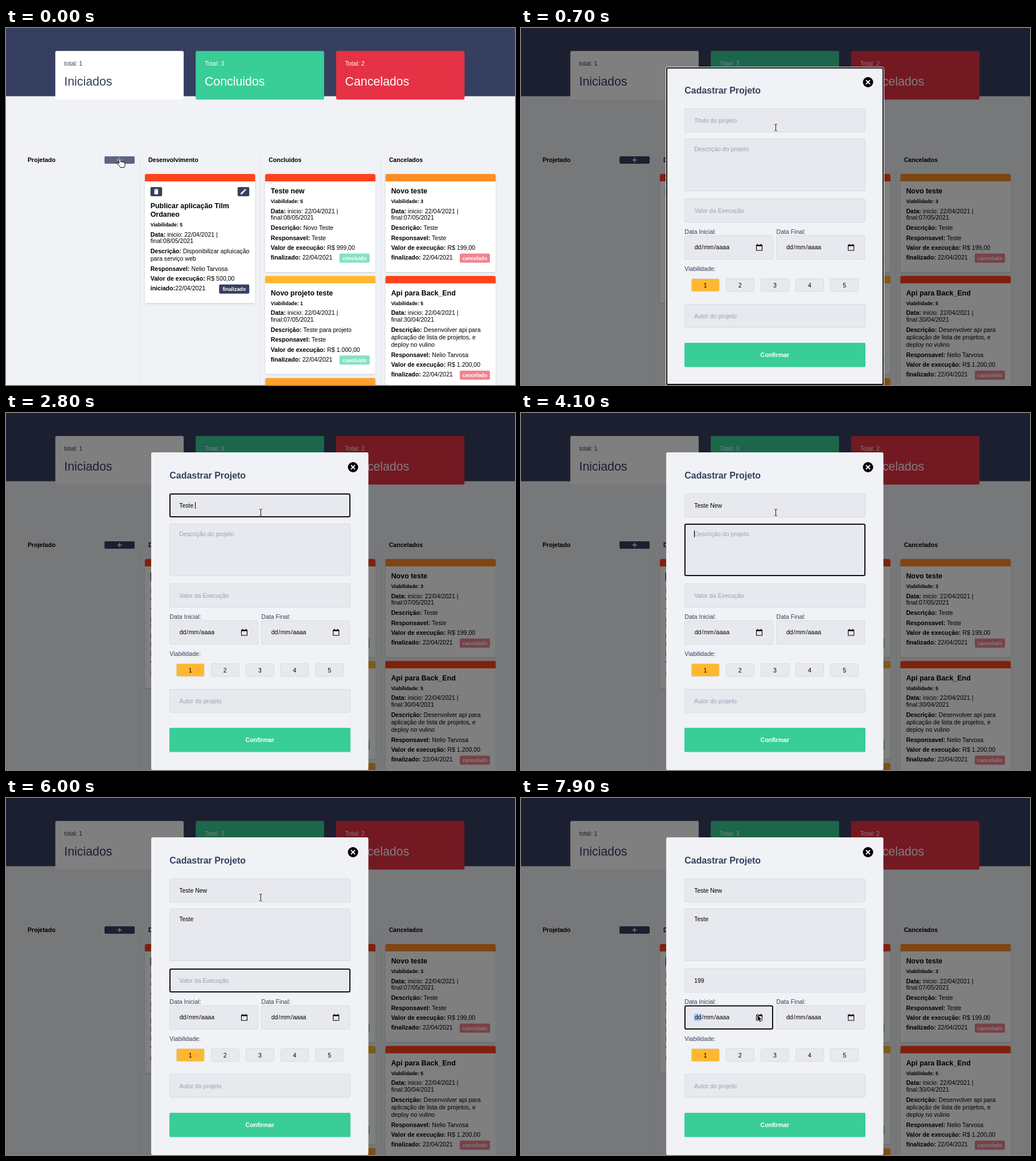
An HTML page for the animation above (8 s loop, 894 by 626 pixels).

```html
<!DOCTYPE html>
<html lang="pt">
<head>
<meta charset="utf-8">
<title>Quadro de projetos</title>
<style>
  html, body { margin: 0; width: 100%; height: 100%; overflow: hidden; background: #f0f2f5; }
  svg { display: block; width: 894px; height: 626px; font-family: "Liberation Sans", Arial, sans-serif; }
  .b { font-weight: bold; }
  .card { filter: drop-shadow(0 1px 1.5px rgba(0, 0, 0, .16)); }
</style>
</head>
<body>
<svg id="stage" viewBox="0 0 894 626"></svg>
<script>
const NAVY = '#363f5f', GREEN = '#39cd98', RED = '#e63245', LOOP = 8000;
const RATE = { 1: '#ffb72f', 2: '#ffa12c', 3: '#fd8d26', 5: '#ff421a' };

const rect = (x, y, w, h, fill, r = 2, more = '') =>
  `<rect x="${x}" y="${y}" width="${w}" height="${h}" rx="${r}" fill="${fill}" ${more}/>`;
const text = (x, y, s, size = 10.6, fill = '#000', more = '') =>
  `<text x="${x}" y="${Math.round(y)}" font-size="${size}" fill="${fill}" ${more}>${s}</text>`;
const bold = 'class="b"';
const mid = 'text-anchor="middle"';
const pair = (label, value) => `<tspan class="b">${label}</tspan>${value}`;
const path = (d, fill, more = '') => `<path d="${d}" fill="${fill}" ${more}/>`;

const TRASH = 'M6 19a2 2 0 0 0 2 2h8a2 2 0 0 0 2-2V7H6zM19 4h-3.5l-1-1h-5l-1 1H5v2h14z';
const PENCIL = 'M3 17.2V21h3.8L17.8 9.9 14 6.2zM20.7 7a1 1 0 0 0 0-1.4l-2.3-2.3a1 1 0 0 0-1.4 0l-1.9 1.8 3.8 3.8z';

function summary(x, label, name, fill, ink) {
  return rect(x, 40.3, 225.5, 85.2, fill, 2.7) +
    text(x + 15.7, 66, label, 10.67, ink) + text(x + 15.7, 101, name, 21.33, ink);
}

function shell(col, top, h, color) {
  const x = 244 + col * 211.2;
  return `<g class="card">${rect(x, top, 193.6, h, '#fff', 3)}</g>` +
    rect(x, top, 193.6, 16, color, 3) + rect(x, top + 13, 193.6, 4, '#fff', 0);
}

function card(col, top, c) {
  const x = 253.7 + col * 211.35, right = x + 173.6;
  const title = c.title.split('|'), note = c.note.split('|');
  let y = top + (c.tools ? 26.3 : 0), out = '';
  if (c.tools) {
    [[x, TRASH], [right - 20.5, PENCIL]].forEach(([bx, d]) => {
      out += rect(bx, top + 23, 20.5, 16, NAVY) +
        path(d, '#fff', `transform="translate(${bx + 3.7} ${top + 24.5}) scale(.54)"`);
    });
  }
  title.forEach((s, i) => out += text(x, y + 34 + i * 14.7, s, 12.45, '#000', bold));
  y += (title.length - 1) * 14.7;
  out += text(x, y + 51, 'Viabilidade: ' + c.rate, 8.8, '#000', bold) +
    text(x, y + 68.6, pair('Data:', ' inicio: 22/04/2021 |')) +
    text(x, y + 80, 'final:' + c.end);
  note.forEach((s, i) =>
    out += text(x, y + 98 + i * 13.3, i ? s : pair('Descrição:', ' ' + s)));
  y += (note.length - 1) * 13.3;
  out += text(x, y + 115.6, pair('Responsavel:', ' ' + c.who)) +
    text(x, y + 133, pair('Valor de execução:', ` R$ ${c.cost}`)) +
    text(x, y + 150, pair(c.tools ? 'iniciado:' : 'finalizado:', (c.tools ? '' : ' ') + '22/04/2021') ) +
    rect(right - 53, y + 139.5, 53, 16, c.tag[1]) +
    text(right - 26.5, y + 151, c.tag[0], 8.85, '#fff', bold + ' ' + mid);
  return shell(col, top, y + 172 - top, RATE[c.rate]) + out;
}

const done = ['concluido', '#87e1c1'], off = ['cancelado', '#f0848f'];

function board() {
  let s = rect(0, 0, 894, 626, '#f0f2f5', 0) + rect(0, 0, 894, 119.6, NAVY, 0) +
    summary(86.6, 'total: 1', 'Iniciados', '#fff', NAVY) +
    summary(333.2, 'Total: 3', 'Concluidos', GREEN, '#fff') +
    summary(579.8, 'Total: 2', 'Cancelados', RED, '#fff');
  [235, 446, 658].forEach(x => s += rect(x, 224, 1, 402, '#e2e5ea', 0));
  ['Projetado', 'Desenvolvimento', 'Concluidos', 'Cancelados'].forEach((n, i) =>
    s += text(i ? 38.5 + i * 211.4 : 38, 235, n, 10.6, '#000', bold));
  s += rect(173, 225, 53, 13, NAVY, 2, 'id="add"') +
    path('M195.5 231.5h8M199.5 227.5v8', 'none', 'stroke="#fff" stroke-width="1.4"');
  return s +
    card(0, 256, { tools: 1, title: 'Publicar aplicação Tilm|Ordaneo', rate: 5, end: '08/05/2021',
      note: 'Disponibilizar apluicação|para serviço web', who: 'Nelio Tarvosa', cost: '500,00', tag: ['finalizado', NAVY] }) +
    card(1, 256, { title: 'Teste new', rate: 5, end: '08/05/2021', note: 'Novo Teste', who: 'Teste', cost: '999,00', tag: done }) +
    card(1, 434.7, { title: 'Novo projeto teste', rate: 1, end: '07/05/2021', note: 'Teste para projeto', who: 'Teste', cost: '1.000,00', tag: done }) +
    shell(1, 613.7, 100, RATE[2]) +
    card(2, 256, { title: 'Novo teste', rate: 3, end: '07/05/2021', note: 'Teste', who: 'Teste', cost: '199,00', tag: off }) +
    card(2, 434.7, { title: 'Api para Back_End', rate: 5, end: '30/04/2021',
      note: 'Desenvolver api para|aplicação de lista de projetos, e|deploy no vulino', who: 'Nelio Tarvosa', cost: '1.200,00', tag: off });
}

// Form fields: box, text baseline, placeholder
const BOX = {
  modal: [255, 69, 382, 557],
  title: [287, 141, 318, 42, 166, 'Titulo do projeto'],
  note: [287, 194, 318, 92, 216, 'Descrição do projeto'],
  cost: [287, 299, 318, 42, 324, 'Valor da Execução'],
  author: [287, 484, 318, 41.5, 509, 'Autor do projeto'],
  date: [287, 363.5, 156, 42.5]
};
const TEXT_X = 304.2;

const field = (x, y, w, h, fill = '#e7e9ee') =>
  rect(x + .5, y + .5, w - 1, h - 1, fill, 2.5, 'stroke="#d7dae1"');

function dateBox(x) {
  const parts = [[17.7, 'dd'], [30.2, '/'], [33.7, 'mm'], [52.2, '/'], [55.5, 'aaaa']];
  return field(x, 363.5, 156, 42.5) +
    (x < 300 ? rect(304, 378, 13, 13, '#a9cdf8', 0, 'id="mark"') : '') +
    parts.map(([dx, s]) => text(x + dx, 388, s, 10.6)).join('') +
    path('M-5-4.5H5V5H-5zM-3-6.5v2M3-6.5v2', 'none',
      `stroke="#000" stroke-width="1.1" transform="translate(${x + 131.5} 385)"`) +
    rect(x + 126.5, 380, 10, 2.5, '#000', 0);
}

function form() {
  let s = rect(0, 0, 894, 626, 'rgba(0,0,0,.5)', 0) + rect(255, 69, 381.5, 557, '#f0f2f5', 2.7) +
    text(287.3, 115, 'Cadastrar Projeto', 15.95, NAVY, bold) +
    '<circle cx="609.5" cy="95" r="9"/>' +
    path('M606 91.5l7 7m0-7l-7 7', 'none', 'stroke="#fff" stroke-width="1.9"');
  ['title', 'note', 'cost', 'author'].forEach(k => {
    const [x, y, w, h, base, hint] = BOX[k];
    s += field(x, y, w, h) + text(TEXT_X, base, hint, 10.5, '#9a9fb2', `id="${k}"`);
  });
  s += text(287.3, 361, 'Data Inicial:', 10.6, NAVY) + text(448.5, 361, 'Data Final:', 10.6, NAVY) +
    dateBox(287) + dateBox(448.2) + text(287.3, 426, 'Viabilidade:', 10.6, NAVY);
  for (let i = 0; i < 5; i++) {
    const x = 298.8 + i * 61.1;
    s += field(x, 439, 50, 23.5, i ? undefined : RATE[1]) + text(x + 24.9, 455, i + 1, 10.6, '#000', mid);
  }
  return s + rect(287, 552, 318, 42.5, GREEN, 2) +
    text(445.8, 577, 'Confirmar', 10.6, '#fff', bold + ' ' + mid) +
    rect(254.5, 68.5, 383, 558, 'none', 3, 'id="halo" stroke="#fff"') +
    '<rect id="ring" rx="2" fill="none" stroke="#101010" stroke-width="2"/>' +
    '<rect id="caret" width="1" height="12"/>';
}

const cursors =
  path('M0 0V12L2.7 9.5 4.6 13.6 6.6 12.7 4.8 8.7H8.5Z', '#000', 'id="arrow" stroke="#fff" stroke-width=".9"') +
  path('M-1.5 8V1.2Q-1.5 0 0 0T1.5 1.2V5Q3.7 4 4.3 5.6 6.2 4.9 6.8 6.3 9 6 9 8V11Q9 13 7.5 15H1Q-1 12-4.5 8.6-4.8 6.6-2.8 7Z',
    '#fff', 'id="hand" stroke="#000"') +
  '<g id="beam" fill="none">' + ['#fff" stroke-width="2.4" opacity=".7', '#000'].map(c =>
    `<path d="M-2.5-5.8H-1L0-5 1-5.8H2.5M0-5V5M-2.5 5.8H-1L0 5 1 5.8H2.5" stroke="${c}"/>`).join('') + '</g>';

document.getElementById('stage').innerHTML = board() + `<g id="form">${form()}</g>` + cursors;
const $ = id => document.getElementById(id);
const show = (id, on) => $(id).style.display = on ? '' : 'none';

// Timelines: [start ms, ...state]
const FOCUS = [[0, ''], [200, 'modal'], [800, 'title'], [4100, 'note'], [5400, 'cost'], [7000, 'date']];
const TYPED = {
  title: [[0, ''], [2000, 'T'], [2100, 'Te'], [2300, 'Tes'], [2400, 'Test'], [2800, 'Teste '],
    [3400, 'Teste N'], [3500, 'Teste Ne'], [3700, 'Teste New']],
  note: [[0, ''], [4700, 'T'], [4800, 'Te'], [5000, 'Tes'], [5100, 'Test'], [5200, 'Teste']],
  cost: [[0, ''], [6500, '1'], [6700, '19'], [6800, '199']]
};
const POINTER = [[0, 'hand', 200, 229.5], [200, 'arrow', 196, 230], [300, 'arrow', 214, 226],
  [400, 'arrow', 268, 213], [500, 'beam', 345, 181], [600, 'beam', 412, 177], [700, 'beam', 447.5, 174.5],
  [7600, 'beam', 428, 225], [7700, 'beam', 392, 305], [7800, 'arrow', 378, 356], [7900, 'arrow', 415, 380]];
const at = (rows, t) => rows.findLast(r => r[0] <= t);

function render(t) {
  const [since, focus] = at(FOCUS, t);
  show('form', t >= 200);
  $('add').setAttribute('fill', t < 200 ? '#5f6580' : NAVY);
  show('halo', focus === 'modal');
  show('mark', focus === 'date');
  show('ring', focus);
  if (focus) {
    const [x, y, w, h] = BOX[focus];
    Object.entries({ x: x + 1, y: y + 1, width: w - 2, height: h - 2 })
      .forEach(([k, v]) => $('ring').setAttribute(k, v));
  }

  let caret = false;
  for (const k in TYPED) {
    const [when, value] = at(TYPED[k], t), node = $(k);
    node.textContent = value.replace(/ /g, '\u00a0') || BOX[k][5];
    node.setAttribute('fill', value ? '#000' : '#9a9fb2');
    if (k === focus) {
      caret = (t - Math.max(since, when)) % 1200 < 600;
      $('caret').setAttribute('x', Math.floor(TEXT_X + (value ? node.getComputedTextLength() : 0)));
      $('caret').setAttribute('y', BOX[k][4] - 10);
    }
  }
  show('caret', caret);

  const [, shape, px, py] = at(POINTER, t);
  ['arrow', 'hand', 'beam'].forEach(id => show(id, id === shape));
  $(shape).setAttribute('transform', `translate(${px} ${py})`);
}

const start = performance.now();
function tick(now) {
  render(Math.max(0, now - start) % LOOP);
  requestAnimationFrame(tick);
}
render(0);
requestAnimationFrame(tick);
</script>
</body>
</html>
```
